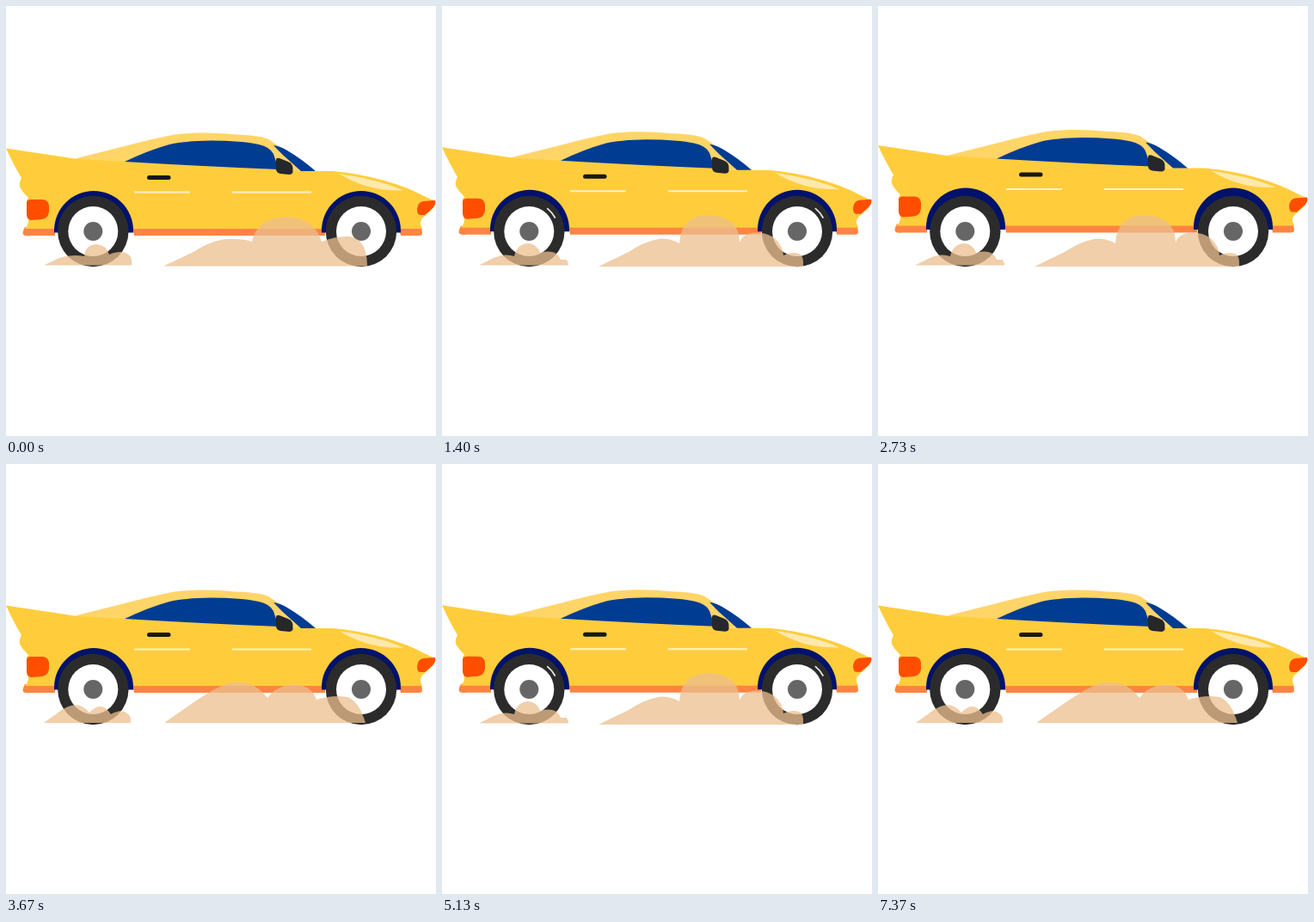
These frames come from a looping animation (500x500 px, 7.41 s). An HTML page with a canvas:

```html
<!DOCTYPE html>
<html lang="en">
<head>
<meta charset="utf-8">
<title>Car in dust</title>
<style>
html, body { margin: 0; width: 100%; height: 100%; overflow: hidden; background: #fff; }
canvas { display: block; width: 500px; height: 500px; }
</style>
</head>
<body>
<canvas id="stage" width="500" height="500"></canvas>
<script>
const ctx = document.getElementById('stage').getContext('2d');
const LOOP = 7410, CYCLE = 53, BOUNCES = 5, TURNS = 4, LIFT = 5.5;
const WHEELS = [101.3, 413];

// Car body, in paint order
const BODY = [
  // sills and bumpers
  ['#ff8442', 'M22 257H57V267H28Q20 268 19.5 264Q20 260 22 257Z M147 257H371V267H149Z M457 257H483L484 264Q484 267 480 267H459Z'],
  // roof
  ['#ffd568', 'M80 177.5L138 163Q172 154 196 149.5C222 146.5 245 147.5 268 149.5Q297 150.5 306 155.5L317 163L352 192H300L138 183Z'],
  // lower shell
  ['#ffcd3c', 'M0 165.5L80 177.5L138 181L230 186L316 190L336 192L380 192Q412 195 440 203Q468 211 486 221L499 227Q500 232 494 238L487 244Q481 249 482 254L484 259H457A46 46 0 0 0 367 259H148A46 46 0 0 0 57 259H22Q26 255 26 249L24 226L26 223Q18 215 16 210Q15 206 18 200Q10 187 0 165.5Z'],
  // wheel arches
  ['#00126b', 'M56 263.5V261A46 46 0 0 1 148 261V263.5Z M367 263.5V261A46 46 0 0 1 459 261V263.5Z'],
  // side window and windshield
  ['#003c92', 'M138 181Q165 168 190 161Q206 157 238 156.5Q274 156.5 294 161Q307 164 311 172L317 190Q230 186.5 138 181Z M311 162Q319 163 327 168Q344 178 360 192H343L333 183Q322 174 311 162Z'],
  // mirror
  ['#25272b', 'M314 179Q314 176 318 177L328 181Q333 183 333.5 188V193Q333 196 329 196L319 195Q314 194 314 189Z'],
  // lamps
  ['#ff4e00', 'M24 228Q25 225 29 225H42Q49 225 50 232V239Q49 247 42 248L29 249Q24 248 24 242Z M478 236Q479 228 485 227L499 226Q501 231 494 237L487 243H481Q478 242 478 236Z'],
  // bonnet shine
  ['#ffe9ad', 'M387 195Q408 198 428 203Q448 208 462 214.5Q436 215 418 209Q402 204 387 195Z'],
  ['#fff2c8', 'M149 215.5H214V217.5H149Z M263 215.5H355V217.5H263Z'],
  ['#17181a', 'M166.500 197H189Q191.500 197 191.500 199.500Q191.500 202 189 202H166.500Q164 202 164 199.500Q164 197 166.500 197Z']
].map(([color, d]) => [color, new Path2D(d)]);

const DUST = [
  'M44 301.5L62 293Q76 288 91 291Q92 278 105 277Q117 278 120 289Q138 282 145 292Q147 296 146 301.500Z' +
  'M183 302.500L218 286Q244 269 266 271Q278 271 286 274Q292 246 326 245Q358 246 367 274Q384 267 400 268Q420 272 420 302.500Z',
  'M43 301.500L60 293Q73 287 84 291Q87 277 100 276Q111 277 114 287Q133 282 138 295H145L147 300V301.500Z' +
  'M182 303L217 286Q240 271 257 270.500Q268 271 276 276Q278 243 311 243Q346 245 346 275Q349 264 366 263.500Q384 264 392 276Q396 281 397 290Q406 285 415 288Q421 290 420 303Z',
  'M44 301L62 288Q83 272 97 289Q111 274 122 291Q138 282 145 295V301Z' +
  'M184 301L217 278Q246 258 262 254Q287 250 304 272Q315 257 335 256.500Q355 257 361 274Q381 268 397 271Q410 275 418 301Z'
].map(d => new Path2D(d));

function disc(x, y, r, color) {
  ctx.fillStyle = color;
  ctx.beginPath();
  ctx.arc(x, y, r, 0, Math.PI * 2);
  ctx.fill();
}

function wheel(x, spin) {
  const y = 262;
  disc(x, y, 41.2, '#2b2b2c');
  disc(x, y, 29, '#fff');
  disc(x, y, 11, '#666');
  // the glint fades in the shade near the ground
  const alpha = Math.min(1, Math.max(0, (0.6 - Math.sin(spin)) * 4));
  ctx.strokeStyle = `rgba(255,255,255,${alpha * 0.9})`;
  ctx.lineWidth = 1.7;
  ctx.lineCap = 'round';
  ctx.beginPath();
  ctx.arc(x, y, 34, spin - 0.2, spin + 0.2);
  ctx.stroke();
}

function draw(step) {
  const k = step % CYCLE;
  const phase = k * BOUNCES / CYCLE % 1;
  const rise = LIFT * (1 - Math.abs(1 - 2 * phase));
  const spin = (k - 20) * TURNS / CYCLE * Math.PI * 2 - 0.69;

  ctx.fillStyle = '#fff';
  ctx.fillRect(0, 0, 500, 500);

  ctx.save();
  ctx.translate(0, -rise);
  for (const [color, path] of BODY) {
    ctx.fillStyle = color;
    ctx.fill(path);
  }
  ctx.restore();

  for (const x of WHEELS) wheel(x, spin);

  ctx.fillStyle = 'rgba(235,191,142,0.75)';
  ctx.fill(DUST[Math.floor(k / 2) % 3]);
}

// Poses advance every 70 ms, shown on a 30 Hz clock
function stepAt(ms) {
  const tick = Math.floor(ms * 0.03 + 0.12);
  return Math.min(105, Math.floor(tick / 2.1 + 1e-6));
}

const start = performance.now();
function loop() {
  draw(stepAt((performance.now() - start) % LOOP));
  requestAnimationFrame(loop);
}
loop();
</script>
</body>
</html>
```
